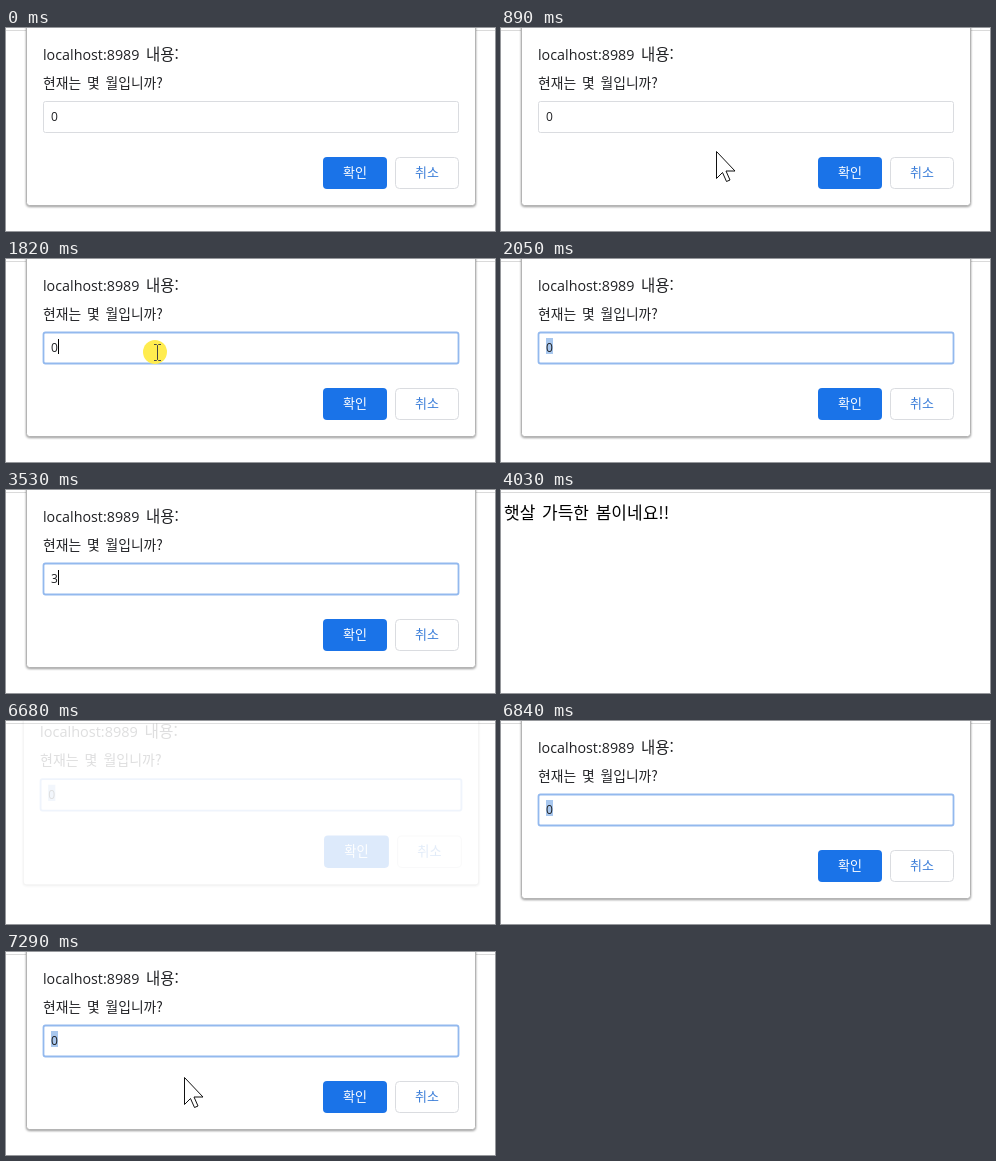
Animation of 489 by 203 pixels, one loop 8 s. Source, as an HTML page:

```html
<!DOCTYPE html>
<html lang="ko">
<head>
<meta charset="utf-8">
<style>
  html, body { margin: 0; width: 100%; height: 100%; overflow: hidden; background: #fff; }
  svg { display: block; width: 489px; height: 203px; }
  text { font-family: "Noto Sans CJK KR", "Noto Sans CJK", sans-serif; font-weight: 300; fill: #202124; }
  .latin { font-family: "Open Sans", "Noto Sans", sans-serif; font-weight: 400; }
  .panel { fill: #fff; stroke: #b4b4b4; filter: drop-shadow(0 1px 1px rgba(0, 0, 0, .4)); }
</style>
</head>
<body>
<svg viewBox="0 0 489 203">
  <path d="M0 2.5H489" stroke="#dadada"/>
  <text id="message" x="3" y="28.500" font-size="17" word-spacing="2" style="fill:#000">햇살 가득한 봄이네요!!</text>

  <g id="dialog">
    <path class="panel" d="M20.500 -8H469.500V174.500q0 3 -3 3H23.500q-3 0 -3 -3Z"/>
    <text class="latin" x="37" y="32" font-size="14.300">localhost:8989</text>
    <text x="140" y="32" font-size="15.500">내용:</text>
    <text x="37" y="60" font-size="13.800" word-spacing="2">현재는 몇 월입니까?</text>
    <rect id="field" x="37.500" y="73.500" width="415" height="31" rx="2" fill="#fff"/>
    <rect id="selection" x="45" y="79" width="7" height="16" fill="#a8c7ee"/>
    <text id="value" class="latin" x="45" y="93" font-size="12"></text>
    <path id="caret" d="M52.500 80V95" stroke="#000"/>
    <rect x="317" y="129" width="64" height="32" rx="4" fill="#1a73e8"/>
    <text x="337" y="149" font-size="13" style="fill:#fff;font-weight:500">확인</text>
    <rect x="389.500" y="129.500" width="63" height="31" rx="4" fill="#fff" stroke="#dadce0"/>
    <text x="409" y="149" font-size="13" style="fill:#3d7fd9">취소</text>
  </g>

  <g id="pointer">
    <circle id="press" cx="-2.500" r="12" fill="#ffec4f"/>
    <path id="arrow" d="M.5 .5V27.500L6.500 21.500L10.500 30.500L14 29L10 20H19Z" fill="#fff" stroke="#111"/>
    <path id="beam" d="M-3.500 -7.500H-1L0 -6.500L1 -7.500H3.500M0 -6.500V7.500M-3.500 8.500H-1L0 7.500L1 8.500H3.500" fill="none" stroke="#444"/>
  </g>
</svg>
<script>
const LOOP = 8000;
const $ = id => document.getElementById(id);
const show = (id, on) => $(id).setAttribute("visibility", on ? "visible" : "hidden");
const within = (t, a, b) => t >= a && t < b;

// Pointer runs: visible span, stepping window, and [time, x, y] keys.
const runs = [
  { from: 520, to: 1820, end: 1260, steps: 10,
    keys: [[520, 305, 190], [742, 266, 148], [890, 215, 123], [1186, 159, 93]] },
  { from: 1820, to: 2050, end: 2050, steps: 3,
    keys: [[1820, 151.5, 93], [1897, 102, 93], [1974, 14, 93], [2050, -20, 93]] },
  { from: 7070, to: LOOP, end: 7290, steps: 3,
    keys: [[7070, 165, 160], [7145, 172, 143], [7290, 178, 125]] }
];

function stepped(t, { from, end, steps }) {
  const size = (end - from) / steps;
  return from + Math.min(steps, Math.floor((t - from) / size + .02)) * size;
}

function place(keys, t) {
  const i = keys.findIndex(k => k[0] > t);
  if (i < 0) return keys[keys.length - 1].slice(1);
  const [a, b] = [keys[i - 1], keys[i]];
  const p = (t - a[0]) / (b[0] - a[0]);
  return [1, 2].map(n => a[n] + (b[n] - a[n]) * p);
}

function presence(t) {
  if (t < 3800) return 1;
  if (t < 4030) return [.85, .45, .12][Math.floor((t - 3800) / 77)];
  if (t < 6680) return 0;
  return t < 6760 ? .14 : t < 6840 ? .75 : 1;
}

function draw(t) {
  const p = presence(t), away = 1 - p;
  $("dialog").setAttribute("opacity", p);
  $("dialog").setAttribute("transform",
    `translate(245 ${-19 * away}) scale(${1 + .0163 * away}) translate(-245 0)`);
  $("message").setAttribute("opacity", within(t, 4030, 6680) ? 1 : 0);

  const focused = t >= 1260;
  $("field").setAttribute("stroke", focused ? "#93b9ee" : "#dadce0");
  $("field").setAttribute("stroke-width", focused ? 1.8 : 1);
  $("value").textContent = within(t, 3530, 6680) ? "3" : "0";
  show("selection", within(t, 1973, 3530) || t >= 6680);
  show("caret", within(t, 1260, 1973) || within(t, 3530, 4030));

  const run = runs.find(r => within(t, r.from, r.to));
  $("pointer").setAttribute("display", run ? "inline" : "none");
  if (!run) return;
  const [x, y] = place(run.keys, stepped(t, run));
  const overField = y > 73 && y < 105;
  $("pointer").setAttribute("transform", `translate(${x} ${y})`);
  show("beam", overField);
  show("arrow", !overField);
  show("press", within(t, 1260, 1420) || within(t, 1820, 2050));
}

const start = performance.now();
function tick() {
  draw((performance.now() - start) % LOOP);
  requestAnimationFrame(tick);
}
tick();
</script>
</body>
</html>
```
